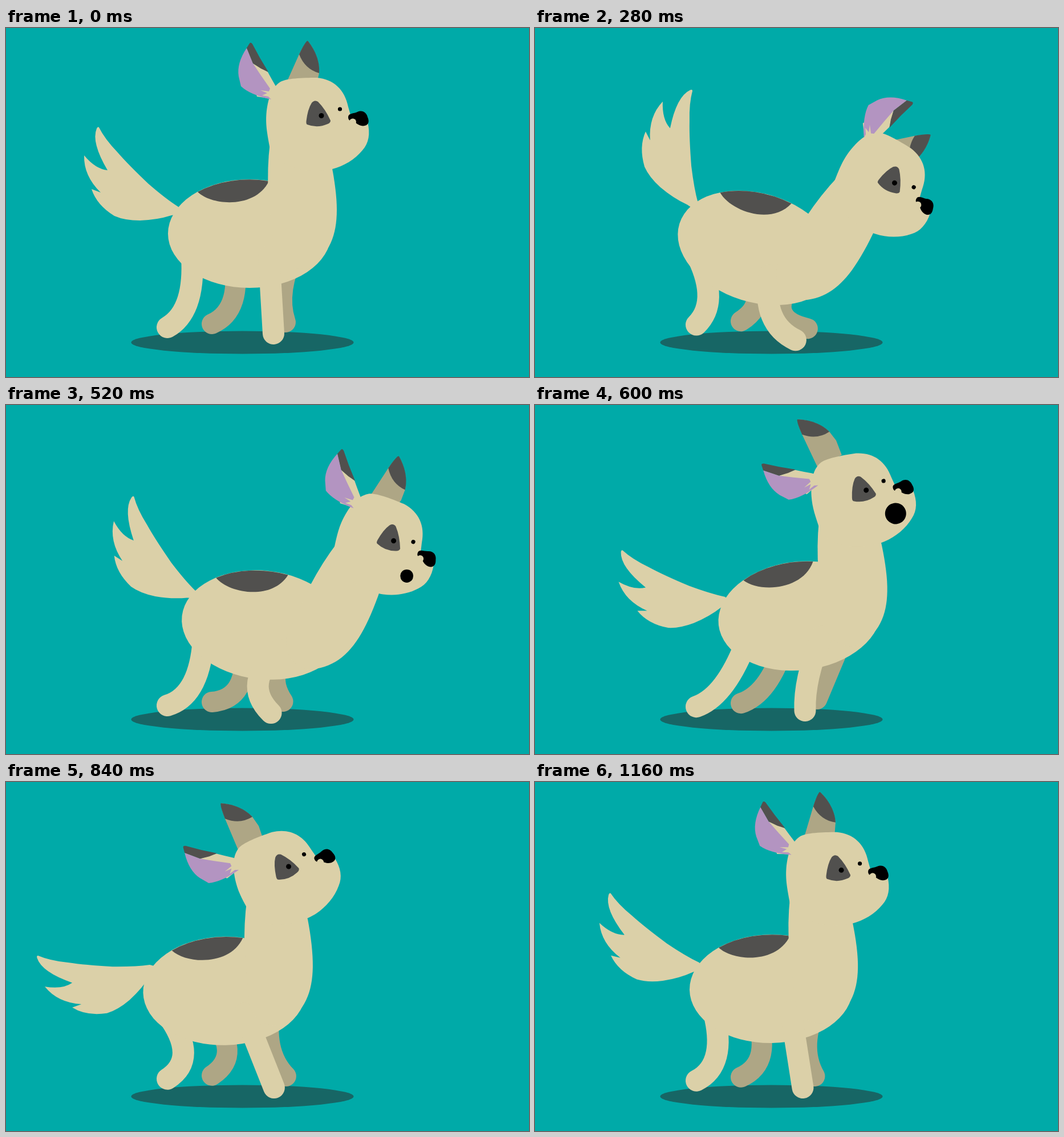
An HTML page with a canvas for the animation above (1240 ms loop, 917 px wide and 611 px high).

```html
<!DOCTYPE html>
<html lang="en">
<head>
<meta charset="utf-8">
<title>Barking dog</title>
<style>
  html, body { margin: 0; overflow: hidden; background: #00aaa8; }
  canvas { display: block; }
</style>
</head>
<body>
<canvas id="stage" width="917" height="611"></canvas>
<script>
const ctx = document.getElementById('stage').getContext('2d');
const TEAL = '#00aaa8', SHADOW = '#176665', CREAM = '#dbd0a8', TAN = '#aea685',
      DARK = '#51504e', LILAC = '#b394c1', BLACK = '#000';

// Key poses: stand, crouch, lunge, bark, lean back, settle. Angles in degrees.
const poses = [
  { t: 0, x: 427, y: 360, tilt: 0, neck: 0, head: 0, ear: 0, tail: 0 },
  { t: 240, x: 379, y: 383.4, tilt: 18.2, neck: 34.5, head: 30.8, ear: 51, tail: 45 },
  { t: 480, x: 444, y: 393, tilt: 12.7, neck: 46.5, head: 38.2, ear: 0, tail: 28 },
  { t: 600, x: 464, y: 369.3, tilt: -6.4, neck: -1.3, head: -8.5, ear: -41, tail: -20.6 },
  { t: 840, x: 383.4, y: 365.8, tilt: -1.3, neck: .9, head: -19, ear: -28, tail: -40.3 },
  { t: 1000, x: 416, y: 362, tilt: -.7, neck: -1, head: 0, ear: -7.6, tail: 24.4 },
  { t: 1160, x: 414, y: 362, tilt: -.7, neck: -1, head: 0, ear: -7.6, tail: -7 }
];

// Joints of the standing dog.
const rest = { body: [427, 360], chest: [500, 383], nape: [515, 200], ear: [478, 120.5],
               rump: [297, 319.5] };

// side: +1 bends forward, -1 bends back.
const legs = {
  farHind: { hip: [398, 400], foot: [361, 518], reach: 145, side: 1, color: TAN, width: 36 },
  farFront: { hip: [507, 390], foot: [490, 515], reach: 130, side: -1, color: TAN, width: 36 },
  nearHind: { hip: [326, 400], foot: [283, 524], reach: 145, side: 1, color: CREAM, width: 38 },
  nearFront: { hip: [461, 400], foot: [469, 535], reach: 134, side: -1, color: CREAM, width: 38 }
};

const shape = {
  body: 'M284 360A143 95 0 1 1 570 360A143 95 0 1 1 284 360Z',
  patch: 'M336 287C362 312 438 316 461 268A143 95 0 0 0 336 287Z',
  neck: 'M463 200L560 200L570 236C576 265 580 295 580 318C580 362 568 396 530 420' +
        'Q490 430 470 390L460 290Q457.5 245 463 200Z',
  head: 'M463 212C458 185 455 170 456.5 150C459 125 465 105 480 95C490 88 520 87 545 87' +
        'C575 90 594 108 600 138L604 152L634 165C639 185 636 202 625 214' +
        'C612 230 592 242 572 247C540 255 480 250 463 212Z',
  eyePatch: 'M536 131Q541 125 547 129Q560 142 569 162Q569 166 564 168Q546 176 528 169' +
            'Q526 168 526.5 163Q529 142 536 131Z',
  nose: 'M600 156C600 149 610 150 616 147C625 143 632 148 634 156C638 165 635 171 626 171.5' +
        'C616 171 613 164 608 163C603 163 600 161 600 156Z',
  ear: 'M422 35L433 62L459 77Q466 90 473 102L477 110L466 124L440 120L430 80Z',
  earInside: 'M422 35Q404 62 408 85L412 102Q428 117 465 125L460 120L449 118L458 114' +
             'L446 109L461 111L463 106L447 83L433 62Z',
  earTip: 'M422 35L427 27Q429 24 432 28L445 52L460 77L447 71L433 62Z',
  farEar: 'M529 23C538 33 550 55 549 79L545 98L532 122L488 104L514 46Q522 29 529 23Z',
  farTip: 'M529 22.5C538 33 551 55 549 79Q524 72 514 46Q522 29 527 23.5Q528.5 22 529 22.5Z',
  tail: 'M302 313Q280 299 250 273Q215 240 195 217Q173 194 163 174Q161 172 159 176' +
        'Q149 200 178 249Q157 247 137 223Q136 259 166 288L150 282Q159 310 190 329' +
        'Q208 337 235 337Q265 336 290 328L310 325Z'
};
for (const k in shape) shape[k] = new Path2D(shape[k]);

function poseAt(t) {
  const i = Math.max(1, poses.findIndex(p => p.t >= t));
  const a = poses[i - 1], b = poses[i], p = (t - a.t) / (b.t - a.t);
  const mixed = {};
  for (const k in a) mixed[k] = a[k] + (b[k] - a[k]) * p;
  return mixed;
}

// Where a resting point goes when its part turns by deg and its pivot moves to pos.
function carry([x, y], pivot, pos, deg) {
  const a = deg * Math.PI / 180, c = Math.cos(a), s = Math.sin(a);
  const dx = x - pivot[0], dy = y - pivot[1];
  return [pos[0] + dx * c - dy * s, pos[1] + dx * s + dy * c];
}

function fill(path, color) {
  ctx.fillStyle = color;
  ctx.fill(path);
}

function dot(x, y, r, color = BLACK) {
  const p = new Path2D();
  p.arc(x, y, r, 0, 2 * Math.PI);
  fill(p, color);
}

// Draws [path, colour] pairs, then an optional extra, turned about a joint.
function part(pivot, pos, deg, layers, extra) {
  ctx.save();
  ctx.translate(...pos);
  ctx.rotate(deg * Math.PI / 180);
  ctx.translate(-pivot[0], -pivot[1]);
  for (const [path, color] of layers) fill(path, color);
  extra?.();
  ctx.restore();
}

// The foot stays planted; the nearer the hip comes, the more the leg bends.
function drawLeg({ hip, foot, reach, side, color, width }, pose) {
  const [hx, hy] = carry(hip, rest.body, [pose.x, pose.y], pose.tilt);
  let [fx, fy] = foot;
  if (side > 0) {
    fy += (hx - hip[0]) * .1;
  } else {
    fx -= pose.tilt * .7;
    fy += Math.max(0, pose.tilt) * .65;
  }
  const dx = fx - hx, dy = fy - hy, d = Math.hypot(dx, dy);
  const slack = Math.sqrt(Math.max(0, reach * reach - d * d));
  const [along, bend] = side > 0 ? [.68, .6 * slack / d] : [.6, -.8 * slack / d];
  ctx.strokeStyle = color;
  ctx.lineWidth = width;
  ctx.lineCap = 'round';
  ctx.beginPath();
  ctx.moveTo(hx, hy);
  ctx.quadraticCurveTo(hx + dx * along + dy * bend, hy + dy * along - dx * bend, fx, fy);
  ctx.stroke();
}

function drawFace(t) {
  dot(553, 153.5, 4.5);
  dot(585.5, 142, 3.6);
  fill(shape.nose, BLACK);
  dot(608, 164.5, 6, CREAM);
  const mouth = 18.5 - Math.abs(t - 600) * .088;
  if (mouth > 0) dot(598, 201.5, mouth);
}

function draw(t) {
  const pose = poseAt(t);
  const body = [pose.x, pose.y];
  const rump = carry(rest.rump, rest.body, body, pose.tilt);
  const chest = carry(rest.chest, rest.body, body, pose.tilt);
  const nape = carry(rest.nape, rest.chest, chest, pose.neck);
  const ear = carry(rest.ear, rest.nape, nape, pose.head);

  ctx.fillStyle = TEAL;
  ctx.fillRect(0, 0, 917, 611);
  ctx.fillStyle = SHADOW;
  ctx.beginPath();
  ctx.ellipse(414.5, 550.5, 195, 20, 0, 0, 2 * Math.PI);
  ctx.fill();

  drawLeg(legs.farHind, pose);
  drawLeg(legs.farFront, pose);
  part(rest.rump, rump, pose.tail, [[shape.tail, CREAM]]);
  // The far ear cannot fold as far forward as the near one.
  part(rest.ear, ear, pose.head + Math.min(pose.ear, 22),
       [[shape.farEar, TAN], [shape.farTip, DARK]]);
  drawLeg(legs.nearHind, pose);
  part(rest.body, body, pose.tilt, [[shape.body, CREAM], [shape.patch, DARK]]);
  drawLeg(legs.nearFront, pose);
  part(rest.chest, chest, pose.neck, [[shape.neck, CREAM]]);
  part(rest.nape, nape, pose.head, [[shape.head, CREAM], [shape.eyePatch, DARK]],
       () => drawFace(t));
  part(rest.ear, ear, pose.head + pose.ear,
       [[shape.ear, CREAM], [shape.earInside, LILAC], [shape.earTip, DARK]]);
}

const start = performance.now();
function tick(now) {
  const t = Math.max(0, now - start) % 1240;
  draw(Math.min(1160, Math.floor(t / 40) * 40));
  requestAnimationFrame(tick);
}
tick(start);
</script>
</body>
</html>
```
